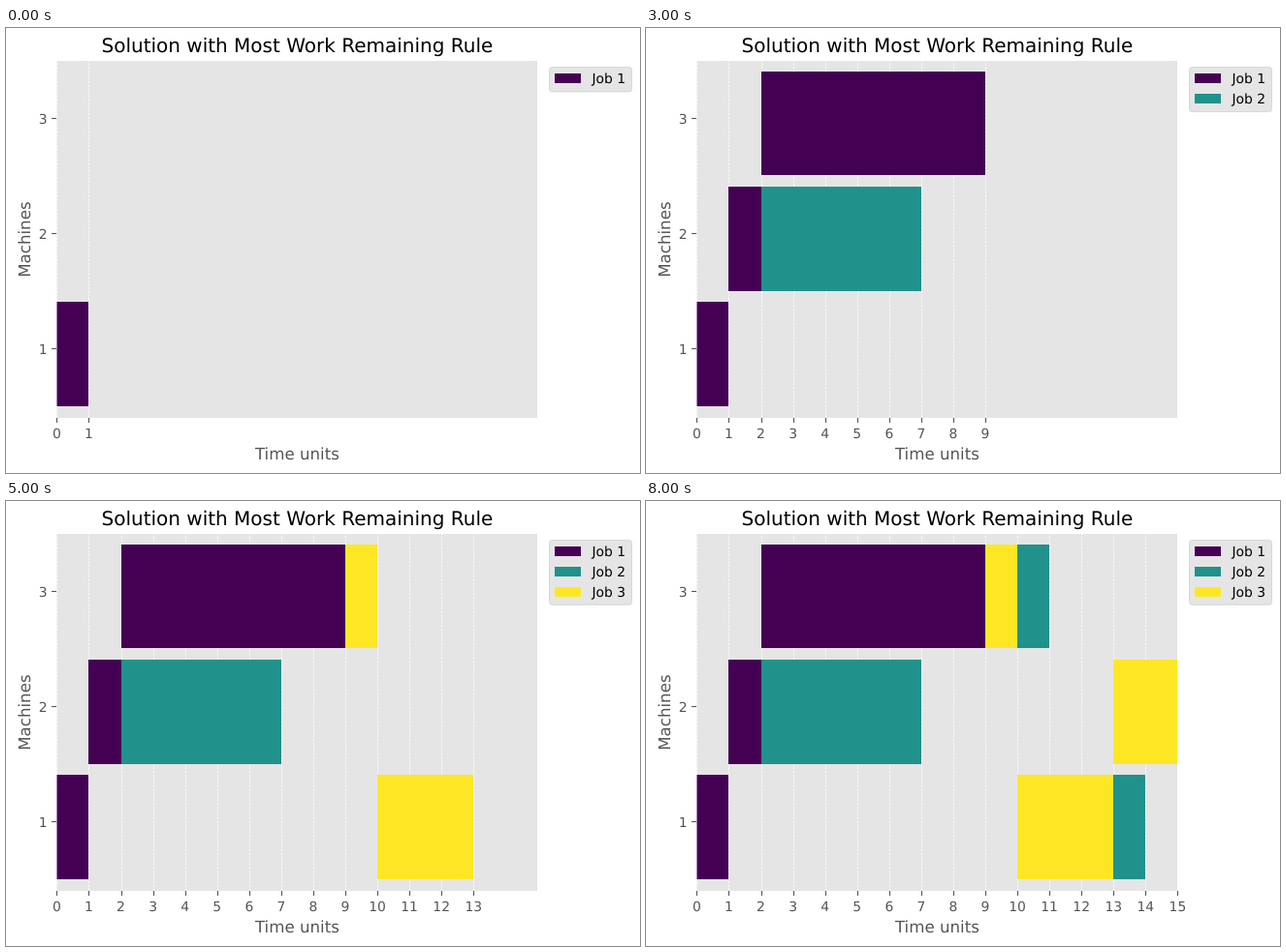
Animation, 654 px wide and 460 px high, one loop 9 s. Source, as an HTML page:

```html
<!DOCTYPE html>
<html lang="en">
<head>
<meta charset="utf-8">
<title>Job schedule</title>
<style>
  html, body { margin: 0; width: 100%; height: 100%; overflow: hidden; background: #fff; }
  svg { display: block; width: 654px; height: 460px; }
  text { font: 13.89px "DejaVu Sans", sans-serif; fill: #555; text-rendering: geometricPrecision; }
  .axis { font-size: 16.67px; }
  .title { font-size: 20px; fill: #000; }
  .legend text { fill: #000; }
  .mid { text-anchor: middle; }
  .end { text-anchor: end; }
  .grid { stroke: #fff; stroke-width: .75; stroke-dasharray: 2.57 1.11; }
  .tick { stroke: #555; stroke-width: 1.1; }
</style>
</head>
<body>
<svg viewBox="0 0 654 460">
  <rect x="52" y="34" width="496" height="369" fill="#e5e5e5"/>
  <g id="grid"></g>
  <g id="bars" shape-rendering="auto"></g>
  <g id="ticks"></g>
  <text class="title mid" x="300.4" y="25">Solution with Most Work Remaining Rule</text>
  <text class="axis mid" x="300.4" y="446">Time units</text>
  <text class="axis mid" transform="translate(25 218.6) rotate(-90)">Machines</text>
  <g class="legend">
    <rect id="frame" x="560.5" y="40.5" width="85" rx="2.8" fill="#e5e5e5" stroke="#ccc" stroke-width=".7"/>
    <g id="entries"></g>
  </g>
</svg>
<script>
const STEP_MS = 1000;
const COLORS = ['#440154', '#21918c', '#fde725'];
const ROWS = [[283, 391], [164, 272], [45, 152]];
// Each operation: job, machine, start, end (in order of dispatch)
const OPERATIONS = [
  [1, 1, 0, 1], [1, 2, 1, 2], [1, 3, 2, 9],
  [2, 2, 2, 7], [3, 3, 9, 10], [3, 1, 10, 13],
  [2, 3, 10, 11], [3, 2, 13, 15], [2, 1, 13, 14]
];

const byId = id => document.getElementById(id);
const unitX = n => 52.4 + n * 496 / 15;
const snapX = n => Math.round(unitX(n));

function add(parent, tag, attrs, content = '') {
  const node = document.createElementNS('http://www.w3.org/2000/svg', tag);
  for (const key in attrs) node.setAttribute(key, attrs[key]);
  node.textContent = content;
  parent.appendChild(node);
  return node;
}

const line = (parent, cls, x1, y1, x2, y2) => add(parent, 'line', { class: cls, x1, y1, x2, y2 });

const bars = OPERATIONS.map(([job, machine, start, end]) => {
  const [top, bottom] = ROWS[machine - 1];
  const x = start ? snapX(start) : 52.5;
  return add(byId('bars'), 'rect', {
    x, y: top, width: snapX(end) - x, height: bottom - top, fill: COLORS[job - 1]
  });
});

const units = Array.from({ length: 16 }, (_, n) => {
  const x = snapX(n) + 0.5;
  const parts = [
    line(byId('ticks'), 'tick', x, 403, x, 408),
    add(byId('ticks'), 'text', { class: 'mid', x: unitX(n), y: 424 }, n)
  ];
  if (n < 15) parts.push(line(byId('grid'), 'grid', x, 403, x, 34));
  return parts;
});

[331.5, 212.5, 93.5].forEach((y, i) => {
  line(byId('ticks'), 'tick', 47, y, 52, y);
  add(byId('ticks'), 'text', { class: 'end', x: 42.7, y: y + 5 }, i + 1);
});

const entries = COLORS.map((fill, i) => {
  const group = add(byId('entries'), 'g', {});
  add(group, 'rect', { x: 566, y: 47 + 21 * i, width: 27, height: 10, fill });
  add(group, 'text', { x: 604.4, y: 57 + 21 * i }, `Job ${i + 1}`);
  return group;
});

const show = (node, visible) => node.setAttribute('visibility', visible ? 'visible' : 'hidden');

function draw(time) {
  const count = Math.floor(time / STEP_MS) % OPERATIONS.length + 1;
  const done = OPERATIONS.slice(0, count);
  const makespan = Math.max(...done.map(op => op[3]));
  const jobs = Math.max(...done.map(op => op[0]));
  bars.forEach((bar, i) => show(bar, i < count));
  units.forEach((parts, n) => parts.forEach(part => show(part, n <= makespan)));
  entries.forEach((entry, i) => show(entry, i < jobs));
  byId('frame').setAttribute('height', 4.7 + 20.7 * jobs);
}

const began = performance.now();
function tick() {
  draw(performance.now() - began);
  requestAnimationFrame(tick);
}
tick();
</script>
</body>
</html>
```
